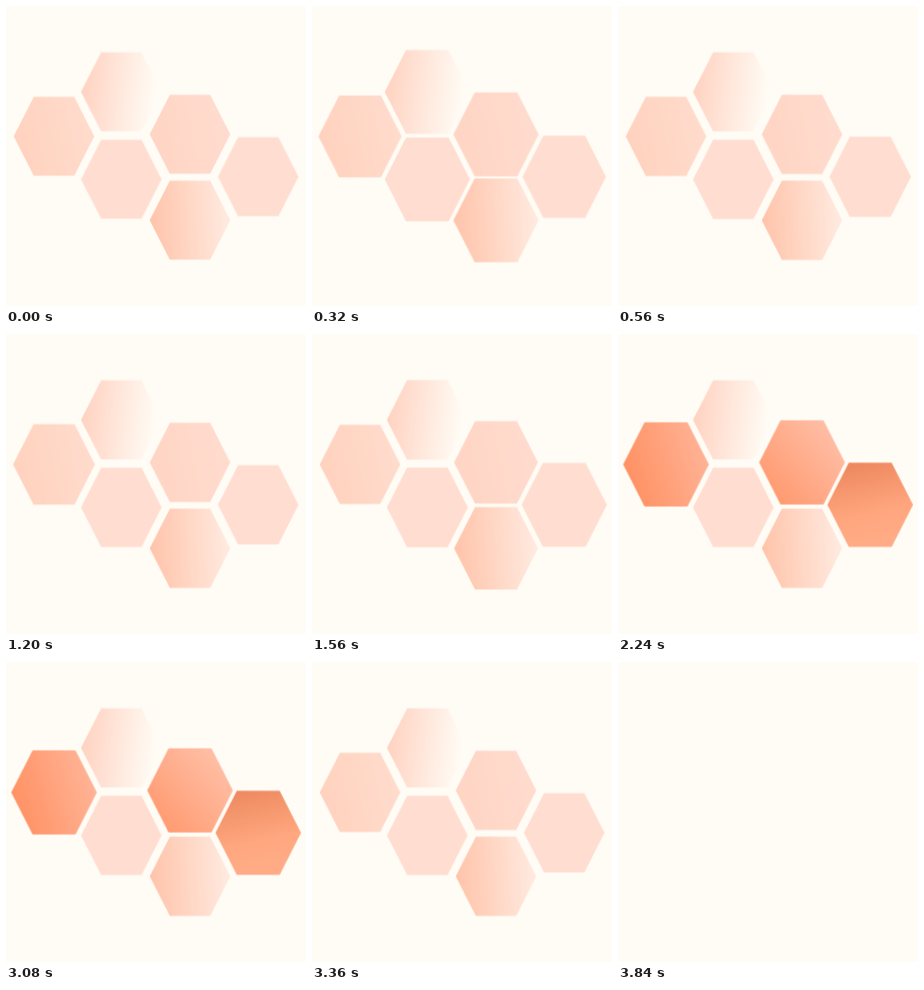
Recreate the animation shown at these times as an HTML page. Size 300 px wide and 300 px high, loop 3.88 s.

```html
<!DOCTYPE html>
<html lang="en">
<head>
<meta charset="utf-8">
<title>Hexagons</title>
<style>
  html, body { margin: 0; width: 100%; height: 100%; overflow: hidden; background: #fffcf5; }
  svg { display: block; width: 100vw; height: 100vh; animation: blink 3880ms infinite; }

  .cell, .lift { transform-box: fill-box; transform-origin: center; }
  .cell { animation: pulse 3880ms calc(var(--col) * 67ms) infinite; }
  .lift { animation: lift 3880ms infinite; }
  .glow { opacity: 0; animation: glow 3880ms infinite; }

  /* two waves, each running left to right by column */
  @keyframes pulse {
    0%, 1.34%, 30.21% { transform: scale(1); animation-timing-function: cubic-bezier(.39, .575, .565, 1); }
    0% { animation-timing-function: linear; }
    5.63%, 34.5% { transform: scale(1.06); animation-timing-function: cubic-bezier(.47, 0, .745, .715); }
    9.92%, 38.79%, 100% { transform: scale(1); animation-timing-function: linear; }
  }
  @keyframes lift {
    0%, 49.82%, 86.42%, 100% { transform: scale(1); animation-timing-function: ease-in-out; }
    57.55%, 78.69% { transform: scale(1.06); animation-timing-function: ease-in-out; }
  }
  @keyframes glow {
    0%, 49.82%, 86.42%, 100% { opacity: 0; animation-timing-function: ease-in-out; }
    57.55%, 78.69% { opacity: 1; animation-timing-function: ease-in-out; }
  }
  @keyframes blink {
    0% { opacity: 1; animation-timing-function: step-end; }
    98.969%, 100% { opacity: 0; animation-timing-function: step-end; }
  }
</style>
</head>
<body>
<svg viewBox="0 0 300 300">
  <defs>
    <path id="hex" d="M-40.3 0L-20.2-39.6H20.2L40.3 0L20.2 39.6H-20.2Z"/>

    <linearGradient id="left" x1="0" y1=".6" x2="1" y2=".4">
      <stop stop-color="#ffd2be"/><stop offset="1" stop-color="#ffdccd"/>
    </linearGradient>
    <linearGradient id="top" x1="0" y1=".45" x2=".92" y2=".55">
      <stop stop-color="#ffd2c0"/><stop offset=".3" stop-color="#ffdfd1"/><stop offset="1" stop-color="#fffcf5"/>
    </linearGradient>
    <linearGradient id="middle" x1="0" y1=".6" x2="1" y2=".4">
      <stop stop-color="#ffd5c4"/><stop offset="1" stop-color="#ffdccf"/>
    </linearGradient>
    <linearGradient id="bottom" x1="0" y1=".5" x2="1" y2=".45">
      <stop stop-color="#ffc4aa"/><stop offset="1" stop-color="#ffebe1"/>
    </linearGradient>

    <linearGradient id="leftGlow" x1="0" y1=".65" x2="1" y2=".35">
      <stop stop-color="#ff9062"/><stop offset="1" stop-color="#ffb497"/>
    </linearGradient>
    <linearGradient id="middleGlow" x1=".1" y1=".85" x2=".9" y2=".15">
      <stop stop-color="#ff9a70"/><stop offset="1" stop-color="#ffbfa7"/>
    </linearGradient>
    <linearGradient id="rightGlow" x1=".4" y1="0" x2=".6" y2=".9">
      <stop stop-color="#ee8960"/><stop offset=".65" stop-color="#ffa67e"/><stop offset="1" stop-color="#ffab85"/>
    </linearGradient>
  </defs>

  <g transform="translate(48 130.3)">
    <g class="cell" style="--col: 0"><g class="lift">
      <use href="#hex" fill="url(#left)"/>
      <use href="#hex" class="glow" fill="url(#leftGlow)"/>
    </g></g>
  </g>
  <g transform="translate(115.3 85.8)">
    <g class="cell" style="--col: 1"><use href="#hex" fill="url(#top)"/></g>
  </g>
  <g transform="translate(115.3 173.3)">
    <g class="cell" style="--col: 1"><use href="#hex" fill="#ffded1"/></g>
  </g>
  <g transform="translate(184 128.3)">
    <g class="cell" style="--col: 2"><g class="lift">
      <use href="#hex" fill="url(#middle)"/>
      <use href="#hex" class="glow" fill="url(#middleGlow)"/>
    </g></g>
  </g>
  <g transform="translate(184 214.2)">
    <g class="cell" style="--col: 2"><use href="#hex" fill="url(#bottom)"/></g>
  </g>
  <g transform="translate(252.2 170.7)">
    <g class="cell" style="--col: 3"><g class="lift">
      <use href="#hex" fill="#ffded1"/>
      <use href="#hex" class="glow" fill="url(#rightGlow)"/>
    </g></g>
  </g>
</svg>
</body>
</html>
```
